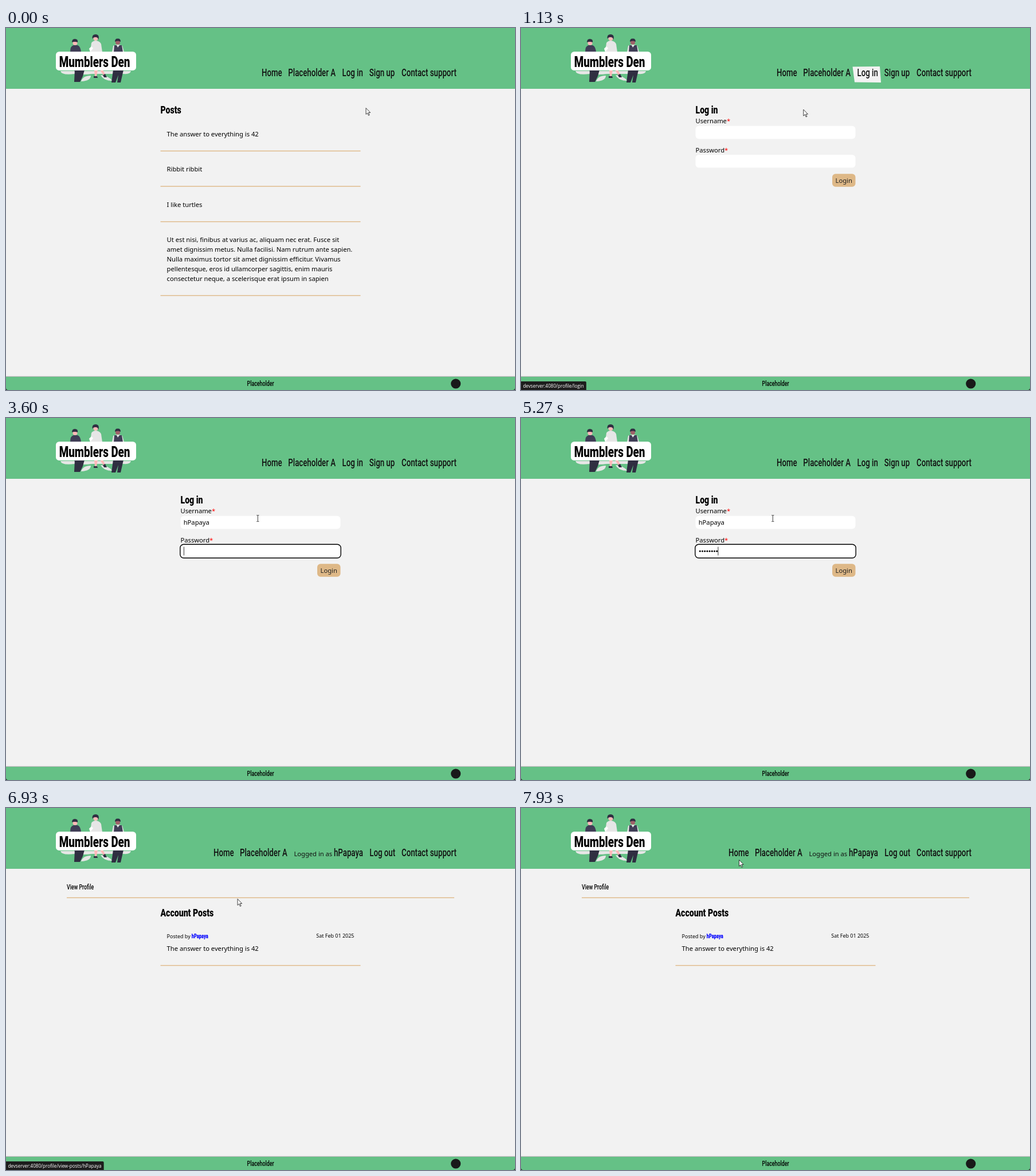
Recreate the animation shown at these times as an HTML page. Size 888 px wide and 631 px high, loop 8 s.

```html
<!DOCTYPE html>
<html lang="en">
<head>
<meta charset="utf-8">
<title>Forum login</title>
<style>
html, body { margin: 0; width: 100%; height: 100%; overflow: hidden; background: #f2f2f2; }
svg { display: block; width: 888px; height: 631px; font: 11.2px "Noto Sans", sans-serif; }
.narrow { font-family: Roboto, sans-serif; font-weight: 500; }
.heavy { font-family: Roboto, sans-serif; font-weight: 900; }
.status { font: 8.1px "Open Sans", sans-serif; fill: #fff; }
</style>
</head>
<body>
<svg id="stage" viewBox="0 0 888 631" xmlns="http://www.w3.org/2000/svg"></svg>
<script>
const LOOP = 8000;
const GREEN = '#65c186', PAPER = '#f2f2f2', TAN = '#deb887', INK = '#111';
const USER = 'hPapaya', SITE = 'Mumblers Den', HOST = 'devserver:4080/profile/';
const stage = document.getElementById('stage');

// ---- markup helpers ----
const rect = (x, y, w, h, fill, rx = 0, more = '') =>
  `<rect x="${x}" y="${y}" width="${w}" height="${h}" rx="${rx}" fill="${fill}" ${more}/>`;
const path = (d, fill) => `<path d="${d}" fill="${fill}"/>`;
const text = (x, y, s, more = '') => `<text x="${x}" y="${y}" ${more}>${s}</text>`;
const group = (id, body) => `<g id="${id}">${body}</g>`;
const rule = (x1, x2, y) => rect(x1, y, x2 - x1, 1.4, TAN);

// condensed display face: one ratio per weight
const display = (cls, ratio) => (x, y, s, size, more = '') =>
  `<text class="${cls}" transform="translate(${x} ${y}) scale(${ratio} 1)" font-size="${size}" ${more}>${s}</text>`;
const narrow = display('narrow', 0.69);
const heavy = display('heavy', 0.735);
const nav = (x, s) => narrow(x, 84, s, 19.2, `fill="${INK}"`);

// ---- header ----
function people() {
  const dark = '#3f3d56', shoe = '#2f2e41', pale = '#e6e6e6', skin = '#ffb8b8', tan = '#a0616a';
  return path('M95 75H218Q217 81 205 80H150Q138 82 120 80Q97 83 95 75Z', pale) +
    path('M131 93Q134 83 148 83Q148 92 131 93ZM186 92Q170 92 165 82Q178 83 186 92Z', pale) +
    // left
    path('M112 42Q112 31 118 30H125Q130 32 131 42Z', dark) +
    `<circle cx="120.5" cy="26" r="4" fill="${skin}"/>` +
    path('M115 25Q115 19 120 19Q126 19 125 25Q120 23 115 25Z', shoe) +
    path('M119 73H137L134 84L129 94H120L119 92L125 91Z', shoe) +
    path('M120 73H126L126 94H119Z', shoe) +
    // middle
    path('M147 42L149 26Q152 22 157 22Q164 23 166 28L168 42Z', pale) +
    path('M145 36L149 32L152 35L147 42Z', '#fff') +
    `<circle cx="156.5" cy="18" r="4" fill="${skin}"/>` +
    path('M151 19Q149 11 157 11Q164 12 161 21Q161 16 156 16Q152 16 151 19Z', shoe) +
    path('M154 73H160L158 84H155ZM164 73H169L173 81L170 83Z', skin) +
    path('M153 84H159L160 87H153ZM169 82L173 80L176 86H171Z', shoe) +
    // right
    path('M185 42L187 31Q195 27 203 31L206 42Z', pale) +
    path('M188 42L189 30H193L195 34L198 30H202L204 42Z', dark) +
    `<circle cx="195" cy="25" r="4" fill="${tan}"/>` +
    path('M190 24Q190 18 195 18.500Q200 18 200 24Q195 21 190 24Z', shoe) +
    path('M187 73H205L200 95H194L196 82L191 95H184Z', shoe);
}

const header = rect(0, 0, 888, 106, GREEN) + people() +
  rect(87, 41.3, 140, 32.700, '#fff', 5.6) +
  heavy(92.700, 67.6, SITE, 25.6) +
  `<g id="tilt"><path d="M578.500 67.500L626 67L628 95L582 94.500Z" fill="${PAPER}"/></g>` +
  group('guestNav', nav(446, 'Home') + nav(492.3, 'Placeholder A') + nav(586.5, 'Log in') + nav(633.8, 'Sign up')) +
  group('userNav', nav(362, 'Home') + nav(408, 'Placeholder A') +
    text(502.4, 84.300, 'Logged in as', `fill="${INK}"`) + nav(572, USER) + nav(634.3, 'Log out')) +
  nav(690, 'Contact support');

// ---- pages ----
const lorem = [
  'Ut est nisi, finibus at varius ac, aliquam nec erat. Fusce sit',
  'amet dignissim metus. Nulla facilisi. Nam rutrum ante sapien.',
  'Nulla maximus tortor sit amet dignissim efficitur. Vivamus',
  'pellentesque, eros id ullamcorper sagittis, enim mauris',
  'consectetur neque, a scelerisque erat ipsum in sapien'];

function posts() {
  let y = 188.5, out = heavy(269.5, 149, 'Posts', 19.2);
  for (const lines of [['The answer to everything is 42'], ['Ribbit ribbit'], ['I like turtles'], lorem]) {
    lines.forEach((s, i) => out += text(280.6, y + i * 16.8, s));
    y += (lines.length - 1) * 16.8;
    out += rule(269.5, 618.5, y + 25.2);
    y += 61.6;
  }
  return out;
}

const field = (y, label) =>
  text(304.5, y, `${label}<tspan fill="#f00">*</tspan>`) + rect(304.5, y + 4.6, 279, 22.4, '#fff', 5.6);

const login = heavy(304.5, 149, 'Log in', 19.2) + field(166.2, 'Username') + field(216.5, 'Password') +
  rect(543, 254.300, 40.5, 22.4, TAN, 5.6) +
  text(563.2, 269.900, 'Login', 'text-anchor="middle" fill="#222"') +
  rect(303.8, 0, 280.4, 23.8, 'none', 6.3, 'id="focus" stroke="#000" stroke-width="1.4"') +
  text(309.7, 186, '', 'id="name"') + group('dots', '') +
  rect(310, 0, 0.8, 15, '#000', 0, 'id="caret"');

const account = narrow(106, 141.7, 'View Profile', 12.8) + rule(106, 782, 155.7) +
  group('mine', heavy(269.5, 188.6, 'Account Posts', 19.2) +
    text(280.6, 226.6, 'Posted by', 'font-size="8.96"') +
    heavy(323.8, 226.600, USER, 10.2, 'fill="#00f"') +
    text(607.4, 226, 'Sat Feb 01 2025', 'font-size="8.96" text-anchor="end"') +
    text(280.6, 248.900, 'The answer to everything is 42') + rule(269.5, 618.5, 273.800));

const footer = rect(0, 606.600, 888, 1, '#000', 0, 'opacity=".12"') +
  rect(0, 607.4, 888, 1.200, '#000', 0, 'opacity=".3"') + rect(0, 608, 888, 23, GREEN) +
  narrow(444, 624.3, 'Placeholder', 12.8, 'text-anchor="middle"') +
  '<circle cx="784.700" cy="620" r="8.6" fill="#191919"/>' +
  path('M0 627Q0 631 4 631H0ZM888 627Q888 631 884 631H888Z', '#222');

const status = rect(-3, 616, 0, 18, '#1d1d1d', 2, 'id="statusBox"') +
  text(3.4, 626.7, '', 'id="statusText" class="status"');

const pointer =
  group('arrow', '<path d="M0 0V11L2.600 8.600L4.400 12.900L6.100 12.200L4.300 8H7.700Z" fill="#fff" stroke="#111" stroke-width=".8"/>') +
  group('beam', '<path d="M-2 -5.500H-.6L0 -5L.6 -5.500H2M0 -5V5M-2 5.500H-.6L0 5L.6 5.500H2" fill="none" stroke="#222" stroke-width=".9"/>');

stage.innerHTML = rect(0, 0, 888, 631, PAPER) + header + group('posts', posts()) + group('login', login) +
  group('account', account) + footer + group('status', status) + pointer;

const el = {};
stage.querySelectorAll('[id]').forEach(n => el[n.id] = n);
const set = (n, attrs) => { for (const k in attrs) n.setAttribute(k, attrs[k]); };
const show = (n, on) => n.setAttribute('visibility', on ? 'inherit' : 'hidden');
const ramp = (t, a, b) => Math.max(0, Math.min(1, (t - a) / (b - a)));

// ---- timeline ----
const track = [
  [200, 628, 139.5], [530, 606, 84], [860, 603, 82], [1000, 566, 98], [1130, 493, 142],
  [1330, 452, 168], [1530, 444, 173.5], [1670, 441.5, 174], [1730, 441, 174.500], [1990, 441, 174.500],
  [2000, 439.3, 175], [6400, 439.3, 175], [6730, 404, 158.5], [7130, 404, 158.5],
  [7930, 380.5, 90.5]];
const nameKeys = [2330, 2600, 2800, 2930, 3070, 3130, 3270];
const passKeys = [4070, 4200, 4330, 4400, 4600, 4670, 4930, 5270];
const typed = (keys, t) => keys.filter(k => t >= k).length;

function mouse(t) {
  let i = track.findIndex(p => p[0] > t);
  if (i === 0) return track[0].slice(1);
  if (i < 0) return track[track.length - 1].slice(1);
  const [a, x, y] = track[i - 1], [b, u, v] = track[i], k = ramp(t, a, b);
  return [x + (u - x) * k, y + (v - y) * k];
}

function drawStatus(t) {
  const onLogin = t >= 470 && t < 1400, onPosts = t >= 6600 && t < 7530;
  show(el.status, onLogin || onPosts);
  el.statusText.textContent = HOST + (onPosts ? 'view-posts/' + USER : 'login');
  el.statusBox.setAttribute('width', el.statusText.getComputedTextLength() + 10.5);
}

function drawForm(t) {
  const onPass = t >= 3600, n = typed(nameKeys, t), m = typed(passKeys, t);
  show(el.focus, t >= 1530);
  el.focus.setAttribute('y', onPass ? 220.2 : 169.900);
  el.name.textContent = USER.slice(0, n);
  let dots = '';
  for (let i = 0; i < m; i++) dots += `<circle cx="${312.3 + i * 4.200}" cy="232.200" r="1.45"/>`;
  el.dots.innerHTML = dots;
  show(el.caret, t >= 1530 && !(t >= 2000 && t < 2330));
  set(el.caret, {
    x: onPass ? 309.900 + m * 4.200 : 309.900 + (n ? el.name.getComputedTextLength() : 0),
    y: onPass ? 224.5 : 174.3
  });
}

function draw(t) {
  const page = t < 1000 ? 'posts' : t < 5670 ? 'login' : 'account';
  for (const p of ['posts', 'login', 'account']) el[p].style.display = p === page ? '' : 'none';
  show(el.guestNav, page !== 'account');
  show(el.userNav, page === 'account');
  show(el.mine, t >= 6930);
  if (page === 'login') drawForm(t);
  drawStatus(t);

  const hover = ramp(t, 470, 670) * (1 - ramp(t, 1170, 1370));
  set(el.tilt, { opacity: hover, transform: `rotate(${(hover - 1) * 12} 603 81)` });

  const beam = t >= 1530 && t < 5530, at = `translate(${mouse(t)})`;
  show(el.beam, beam);
  show(el.arrow, !beam);
  set(beam ? el.beam : el.arrow, { transform: at });
}

function tick() {
  draw(performance.now() % LOOP);
  requestAnimationFrame(tick);
}
tick();
</script>
</body>
</html>
```
